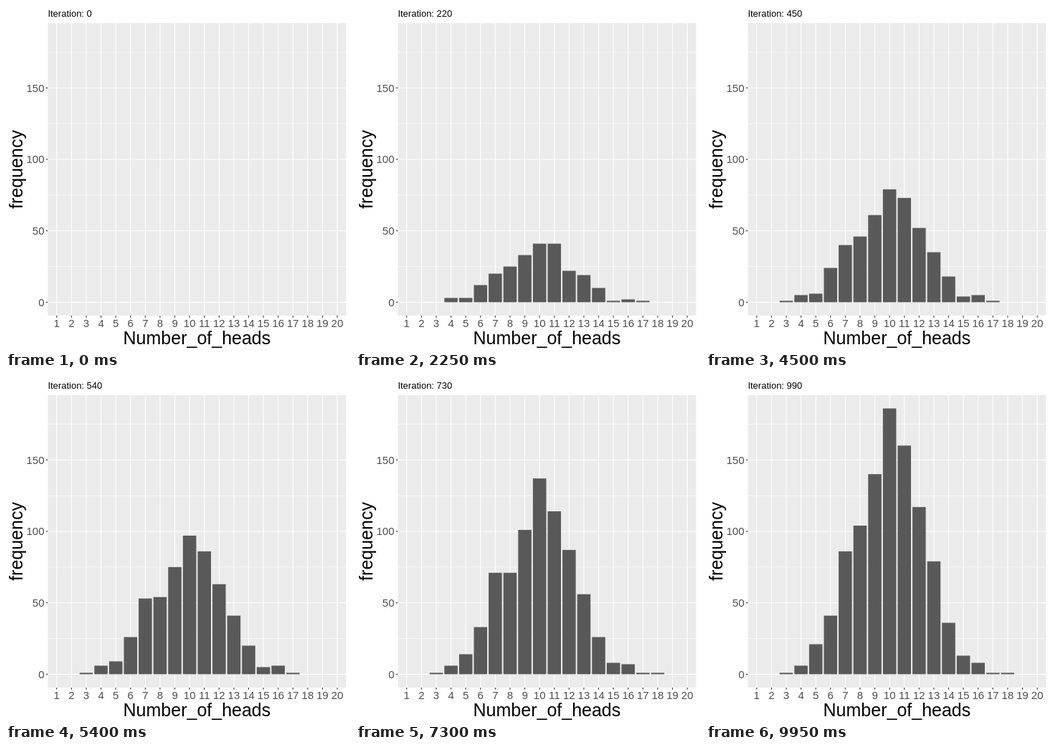
Write an HTML page with a canvas that moves like this. It is 480x480 px and loops after 10 s.

```html
<!DOCTYPE html>
<html>
<head>
<meta charset="utf-8">
<style>
  html, body { margin: 0; width: 100%; height: 100%; overflow: hidden; background: #fff; }
  canvas { display: block; }
</style>
</head>
<body>
<canvas id="chart" width="480" height="480"></canvas>
<script>
const ctx = document.getElementById('chart').getContext('2d');
const LOOP = 10000, STEP = 50;
const panel = { left: 58.4, top: 23.9, right: 474.5, bottom: 431.9 };
const colWidth = (panel.right - panel.left) / 20.2;
const xOf = heads => panel.left + (heads - 0.4) * colWidth;
const yOf = count => 413.36 - count * 1.994;

// Common outcomes: counts reached after these numbers of trials.
const trials = [0, 130, 330, 450, 630, 830, 1000];
const common = {
  5: [0, 2, 4, 6, 11, 17, 21],
  6: [0, 5, 19, 24, 28, 37, 41],
  7: [0, 11, 28, 40, 65, 76, 86],
  8: [0, 15, 34, 46, 61, 81, 104],
  9: [0, 20, 45, 61, 89, 112, 140],
  10: [0, 23, 59, 79, 115, 159, 186],
  11: [0, 24, 57, 73, 99, 129, 160],
  12: [0, 11, 33, 52, 73, 100, 117],
  13: [0, 11, 27, 35, 47, 64, 79],
  14: [0, 5, 14, 18, 21, 31, 36]
};
// Rare outcomes: the trial at which each one turns up.
const rare = {
  3: [270],
  4: [70, 160, 220, 290, 390, 540],
  15: [190, 270, 370, 430, 500, 580, 680, 730, 840, 880, 910, 950, 980],
  16: [90, 180, 360, 400, 440, 500, 590, 980],
  17: [60],
  18: [690]
};

function countAt(heads, n) {
  if (rare[heads]) return rare[heads].filter(trial => trial <= n).length;
  const counts = common[heads];
  if (!counts) return 0;
  let k = 1;
  while (trials[k] < n) k++;
  const part = (n - trials[k - 1]) / (trials[k] - trials[k - 1]);
  return Math.round(counts[k - 1] + (counts[k] - counts[k - 1]) * part);
}

function line(x1, y1, x2, y2, color, width) {
  ctx.strokeStyle = color;
  ctx.lineWidth = width;
  ctx.beginPath();
  ctx.moveTo(x1, y1);
  ctx.lineTo(x2, y2);
  ctx.stroke();
}

function text(str, x, y, size, align, color) {
  ctx.font = size + 'px "Liberation Sans", Arial, sans-serif';
  ctx.textAlign = align;
  ctx.fillStyle = color;
  ctx.fillText(str, x, y);
}

function drawGrid() {
  ctx.fillStyle = '#ebebeb';
  ctx.fillRect(panel.left, panel.top, panel.right - panel.left, panel.bottom - panel.top);
  for (let v = 25; v < 200; v += 50) line(panel.left, yOf(v), panel.right, yOf(v), '#fff', 0.53);
  for (let v = 0; v < 200; v += 50) line(panel.left, yOf(v), panel.right, yOf(v), '#fff', 1.07);
  for (let h = 1; h <= 20; h++) line(xOf(h), panel.top, xOf(h), panel.bottom, '#fff', 1.07);
}

function drawAxes() {
  for (let v = 0; v < 200; v += 50) {
    line(panel.left - 2.75, yOf(v), panel.left, yOf(v), '#333', 1.07);
    text(v, 53.5, Math.round(yOf(v) + 5.3), 15, 'right', '#4d4d4d');
  }
  for (let h = 1; h <= 20; h++) {
    line(xOf(h), panel.bottom, xOf(h), panel.bottom + 2.75, '#333', 1.07);
    text(h, xOf(h), 448, 15, 'center', '#4d4d4d');
  }
  text('Number_of_heads', 266.4, 472, 25, 'center', '#000');
  ctx.save();
  ctx.translate(22.6, 228);
  ctx.rotate(-Math.PI / 2);
  text('frequency', 0, 0, 25, 'center', '#000');
  ctx.restore();
}

function draw() {
  const tick = Math.floor(performance.now() % LOOP / STEP);
  const shown = Math.floor(tick / 2) * 10;
  const drawn = Math.ceil(tick / 2) * 10; // bars run half a step ahead of the label
  ctx.fillStyle = '#fff';
  ctx.fillRect(0, 0, 480, 480);
  drawGrid();
  ctx.fillStyle = '#595959';
  for (let h = 3; h <= 18; h++) {
    const top = yOf(countAt(h, drawn));
    ctx.fillRect(xOf(h) - 0.45 * colWidth, top, 0.9 * colWidth, yOf(0) - top);
  }
  drawAxes();
  text('Iteration: ' + shown, 58.4, 15, 13, 'left', '#000');
  requestAnimationFrame(draw);
}
draw();
</script>
</body>
</html>
```
